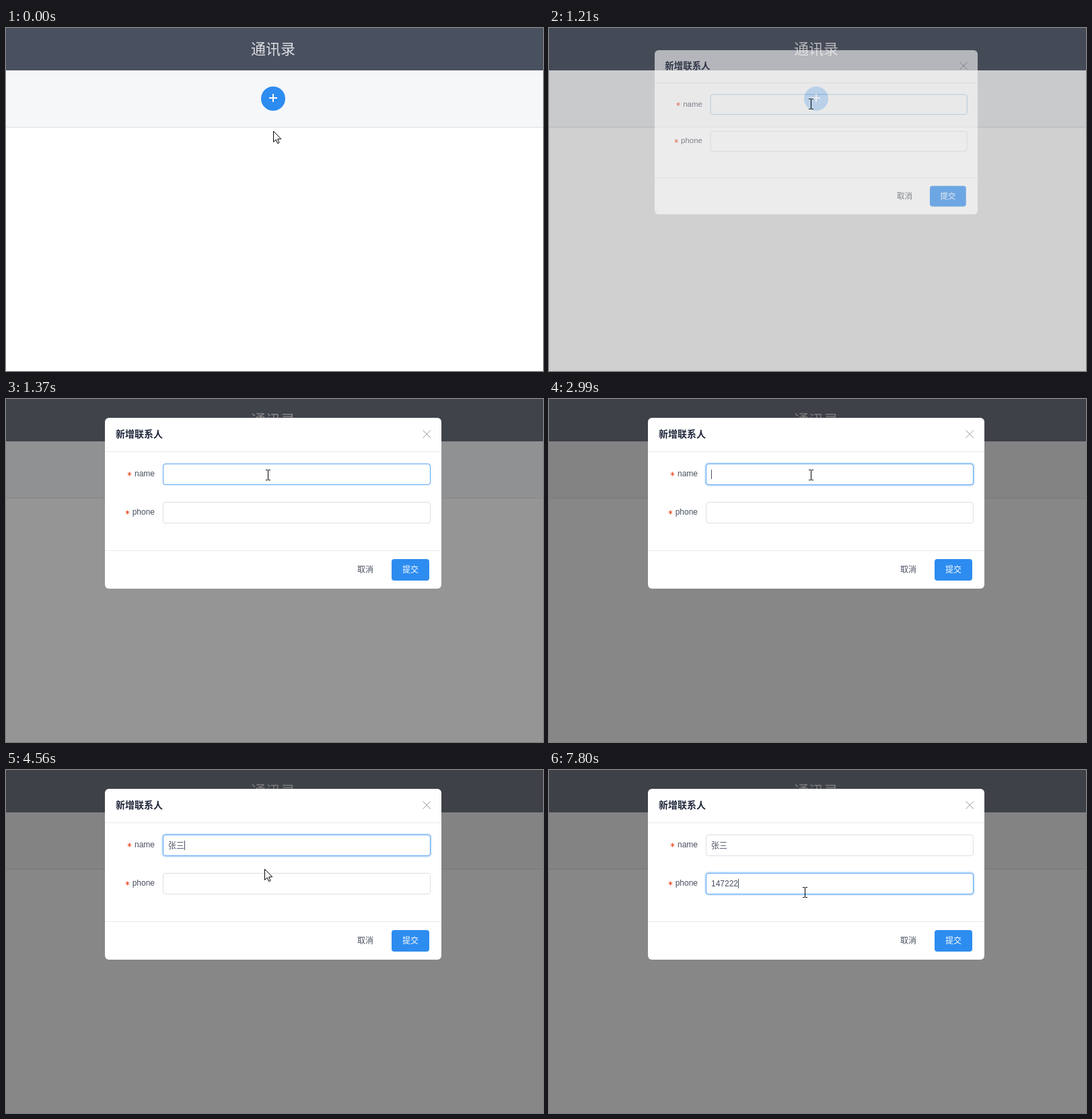
Recreate the animation shown at these times as an HTML page. Size 798 px wide and 510 px high, loop 8 s.

```html
<!DOCTYPE html>
<html lang="zh">
<head>
<meta charset="utf-8">
<style>
  html, body { margin: 0; width: 100%; height: 100%; overflow: hidden; background: #fff; }
  svg { display: block; width: 798px; height: 510px; }
  text { font: 12px "Liberation Sans", "Noto Sans CJK SC", "Noto Sans CJK", sans-serif; fill: #495060; white-space: pre; }
  .title { font-size: 22px; fill: #dddee1; }
  .head { font-size: 14px; font-weight: bold; fill: #1c2438; }
  .ime { font-size: 16px; fill: #333; }
  .mid { text-anchor: middle; }
  .end { text-anchor: end; }
  .field { fill: #fff; stroke: #dddee1; }
  .hover { fill: none; stroke: #57a3f3; }
  .glow { fill: none; stroke: #2d8cf0; stroke-opacity: .2; stroke-width: 2; }
</style>
</head>
<body>
<svg viewBox="0 0 798 510">
  <defs>
    <g id="box">
      <rect class="field" x="233.5" y=".5" width="397" height="31" rx="3.5"/>
    </g>
    <rect id="edge" class="hover" x="233.5" y=".5" width="397" height="31" rx="3.5"/>
    <rect id="ring" class="glow" x="232" y="-1" width="400" height="34" rx="5"/>
    <path id="star" d="M0-3V3M-2.6-1.6L2.6 1.6M2.6-1.6L-2.6 1.6" stroke="#ed3f14" fill="none"/>
  </defs>

  <rect width="798" height="63" fill="#495060"/>
  <text class="title mid" x="397" y="38.5">通讯录</text>
  <rect y="63" width="798" height="84" fill="#f5f7f9"/>
  <rect y="147" width="798" height="1" fill="#dddee1"/>
  <circle id="add" cx="397" cy="105" r="18"/>
  <path d="M391 104H403M397 98V110" stroke="#fff" stroke-width="2"/>

  <rect id="mask" width="798" height="510" fill="#373737" fill-opacity=".6"/>

  <g id="modal">
    <rect x="147" y="28" width="500" height="254" rx="6" fill="#fff"/>
    <text class="head" x="163" y="57">新增联系人</text>
    <path d="M619.5 46.5L631 58M631 46.5L619.5 58" stroke="#999" fill="none"/>
    <path d="M147 78.5H647M147 225.5H647" stroke="#e9eaec"/>
    <use href="#star" x="183.5" y="111.5"/>
    <use href="#star" x="180.5" y="168.5"/>
    <text class="end" x="221" y="115">name</text>
    <text class="end" x="221" y="172">phone</text>
    <g transform="translate(0 96)">
      <use href="#box"/><use id="nameEdge" href="#edge"/><use id="nameRing" href="#ring"/>
    </g>
    <g transform="translate(0 153)">
      <use href="#box"/><use id="phoneEdge" href="#edge"/><use id="phoneRing" href="#ring"/>
    </g>
    <text id="name" x="241" y="117"></text>
    <text id="phone" x="241" y="173"></text>
    <rect id="caret" width="1" height="14" fill="#495060"/>
    <text class="mid" x="534" y="258">取消</text>
    <rect x="573" y="238" width="56" height="32" rx="4" fill="#2d8cf0"/>
    <text class="mid" x="601" y="258" style="fill:#fff">提交</text>
  </g>

  <g id="ime">
    <rect id="panel" x="278.5" y="122.5" height="78" fill="#fff" stroke="#c4c8cf"/>
    <text id="pinyin" class="ime" x="290" y="149"></text>
    <text id="words" class="ime" x="290" y="183"></text>
  </g>

  <g id="cursor">
    <path id="arrow" d="M.5.5V16.5L4.2 13 6.6 18.6 9 17.6 6.6 12H11.7Z" fill="#fff" stroke="#000"/>
    <path id="hand" d="M-.5.5Q1.5.5 1.5 2V7.5Q4 6.5 4.8 8.3 7 7.5 7.8 9.2 10.5 8.6 10.5 11V15Q10.5 17 8.5 19V21.5H-1.5V19.5L-5.5 13.5Q-5.5 11-2 13V2Q-2 .5-.5.5Z" fill="#fff" stroke="#000"/>
    <path id="beam" d="M-3-7.5H0M1-7.5H4M-3 7.5H0M1 7.5H4M.5-7V7" fill="none" stroke="#000"/>
  </g>
</svg>
<script>
const $ = id => document.getElementById(id);
const LOOP = 8000, PHONE = '147222', PINYIN = 'zhangs';
const steps = [0, 430, 510, 590, 660, 740, 910, 1060, 1140, 1210, 1290, 1370, 1440, 1900, 2060, 2130,
  2440, 2990, 3220, 3300, 3380, 3460, 3540, 3770, 4070, 4560, 4640, 4710, 4780, 5010, 5090, 5160,
  5540, 5890, 6170, 6490, 7020, 7480, 7650, 7800];
const letters = [3220, 3300, 3380, 3460, 3540, 3770];
const digits = [5890, 6170, 6490, 7480, 7650, 7800];
const nameBlink = [[1900, 2440], [2990, 3540], [4070, 4640]];
const phoneBlink = [[5010, 5540], [5890, 7020], [7480, LOOP]];
// time, x, y of the pointer
const path = [[0, 397, 153], [370, 397, 153], [740, 387, 115], [780, 387, 115], [910, 389, 113],
  [4480, 389, 113], [4560, 384, 147], [4780, 380, 182], [LOOP, 380, 182]];

const ramp = (t, a, b) => Math.min(1, Math.max(0, (t - a) / (b - a)));
const count = (list, t) => list.filter(s => s <= t).length;
const within = (list, t) => list.some(([a, b]) => t >= a && t < b);
const show = (id, on) => $(id).setAttribute('opacity', +on);

function pointer(t) {
  const i = Math.max(1, path.findIndex(p => p[0] >= t));
  const [a, x, y] = path[i - 1], [b, u, v] = path[i];
  const k = ramp(t, a, b);
  return [Math.round(x + (u - x) * k), Math.round(y + (v - y) * k)];
}

function drawCursor(t) {
  const [x, y] = pointer(t);
  const overAdd = t < 1140 && Math.hypot(x - 397, y - 105) < 18;
  const beam = t >= 1140 && (y < 128 || y >= 153);
  $('cursor').setAttribute('transform', `translate(${x} ${y})`);
  show('hand', overAdd);
  show('beam', beam);
  show('arrow', !overAdd && !beam);
}

function drawIme(t) {
  const on = t >= 3220 && t < 4070, wide = t >= 3770;
  show('ime', on);
  $('panel').setAttribute('width', wide ? 400 : 321);
  $('pinyin').textContent = PINYIN.slice(0, count(letters, t));
  $('words').textContent = wide ? '1.张三  2.掌声  3.张  4.长  5.章' : '1.张  2.长  3.章  4.掌  5.涨';
}

function draw(t) {
  const light = ramp(t, 600, 740);
  $('add').setAttribute('fill', `rgb(${45 + 42 * light},${140 + 23 * light},${240 + 3 * light})`);
  show('mask', ramp(t, 1083, 1408));

  const pop = 1 - (1 - ramp(t, 1085, 1365)) ** 1.55;
  const scale = .9 + .1 * pop;
  show('modal', pop);
  $('modal').setAttribute('transform', `translate(397 155) scale(${scale}) translate(-397 -155)`);

  const blur = ramp(t, 4940, 5160);
  show('nameEdge', ramp(t, 1120, 1370) * (1 - blur));
  show('nameRing', ramp(t, 2000, 2130) * (1 - blur));
  show('phoneEdge', ramp(t, 4600, 4780));
  show('phoneRing', blur);

  const typed = count(digits, t), onPhone = t >= 5010;
  $('name').textContent = t >= 4070 ? '张三' : '';
  $('phone').textContent = PHONE.slice(0, typed);
  $('caret').setAttribute('x', onPhone ? Math.round(241 + 6.674 * typed) : t >= 4070 ? 265 : 241);
  $('caret').setAttribute('y', onPhone ? 162 : 105);
  show('caret', within(onPhone ? phoneBlink : nameBlink, t));

  drawIme(t);
  drawCursor(t);
}

function tick() {
  const t = performance.now() % LOOP;
  draw(steps[count(steps, t) - 1]);
  requestAnimationFrame(tick);
}
tick();
</script>
</body>
</html>
```
